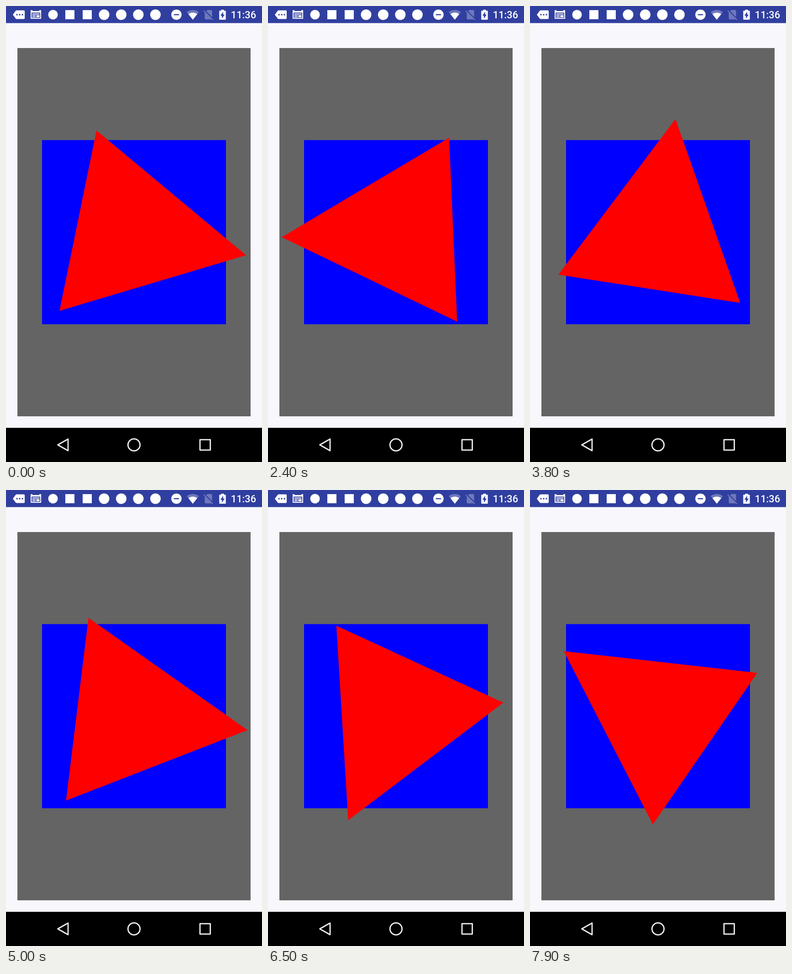
Animation, 561 px wide and 998 px high, one loop 8 s. Source, as an HTML page:

```html
<!DOCTYPE html>
<html lang="en">
<head>
<meta charset="utf-8">
<title>Rotating triangle</title>
<style>
  html, body { margin: 0; width: 100%; height: 100%; overflow: hidden; background: #f8f8fc; }
  svg { display: block; width: 561px; height: 998px; }
  text { font: 500 21.8px Roboto, sans-serif; }
</style>
</head>
<body>
<svg viewBox="0 0 561 998">
  <rect width="561" height="998" fill="#f8f8fc"/>
  <rect width="561" height="37.4" fill="#303f9f"/>

  <!-- status bar -->
  <g fill="#fff">
    <path d="M15 19 21 10.8Q22 9.5 23.5 9.5H39Q41 9.5 41 11.5V26.5Q41 28.5 39 28.5H23.5Q22 28.5 21 27.2Z"/>
    <g fill="#303f9f">
      <circle cx="24" cy="19" r="1.7"/><circle cx="30" cy="19" r="1.7"/><circle cx="36" cy="19" r="1.7"/>
    </g>
    <path d="M54 9H58V11H73V9H77V28H54ZM56 14.5V26H75V14.5Z" fill-rule="evenodd"/>
    <path d="M57.5 16.500H73.500V18.500H57.500ZM57.500 20H65V21.700H57.500ZM57.500 23H65V24.700H57.500ZM66.500 20H73.500V24.700H66.500Z"/>
    <circle cx="103" cy="19" r="10.5"/>
    <rect x="130" y="9" width="20" height="20"/>
    <rect x="168" y="9" width="20" height="20"/>
    <circle cx="215" cy="19" r="11.5"/>
    <circle cx="252.5" cy="19" r="11.5"/>
    <circle cx="290" cy="19" r="11.5"/>
    <circle cx="327.5" cy="19" r="11.5"/>
    <circle cx="373.5" cy="19" r="11.3"/>
    <rect x="367.8" y="17.8" width="11.4" height="2.4" fill="#303f9f"/>
    <g transform="translate(395.6 5.2) scale(1.15)">
      <path d="M12 21.5 23.64 7C23.2 6.66 18.700 3 12 3S.8 6.66.36 7Z" opacity=".3"/>
      <path d="M12 21.500 20.470 10.950C20 10.600 16.800 8 12 8S4 10.600 3.530 10.950Z"/>
    </g>
    <path transform="translate(429.800 5.200) scale(1.150)" opacity=".3"
      d="M19 5C19 3.900 18.100 3 17 3H10L7.660 5.340 19 16.680ZM3.650 3.880 2.380 5.150 5 7.770V19C5 20.100 5.900 21 7 21H17Q17.500 21 18 20.740L19.850 22.620 21.120 21.350Z"/>
    <path d="M471.500 8H477.500V10.300H480.500Q481.700 10.300 481.700 11.500V28.800Q481.700 30 480.500 30H468.500Q467.300 30 467.300 28.800V11.500Q467.300 10.300 468.500 10.300H471.500Z"/>
    <path d="M475.800 12.500 469.800 21.300H473.200V27.800L479.200 18.800H475.800Z" fill="#303f9f"/>
    <text x="492.800" y="26.800">11:36</text>
  </g>

  <!-- scene -->
  <rect x="25" y="92" width="511" height="806" fill="#646464"/>
  <rect x="79" y="293.500" width="403" height="403" fill="#00f"/>
  <path id="tri" d="M250.700 0-125.300 201.500V-201.500Z" fill="#f00"/>

  <!-- navigation bar -->
  <rect y="923.200" width="561" height="75"/>
  <g fill="none" stroke="#eee" stroke-width="2.800" stroke-linejoin="round">
    <path d="M113.500 960.500 136 947.800V973.200Z"/>
    <circle cx="280.500" cy="960.500" r="13.200"/>
    <rect x="425.100" y="949.200" width="22.600" height="22.600"/>
  </g>
</svg>
<script>
  const LOOP = 8000, STEP = 100;
  // [time in ms, angle in degrees]: about 72 degrees a second, slightly uneven
  const keys = [[0, 11.6], [1100, 85.1], [2400, 177.5], [3800, 278.8],
                [5000, 367], [6500, 474.7], [7900, 574.6]];
  const tri = document.getElementById('tri');

  function angleAt(t) {
    const i = Math.max(1, keys.findIndex(k => k[0] >= t));
    const [t0, a0] = keys[i - 1], [t1, a1] = keys[i];
    return a0 + (a1 - a0) * (t - t0) / (t1 - t0);
  }

  function draw() {
    const t = Math.floor(performance.now() % LOOP / STEP) * STEP;
    tri.setAttribute('transform', `translate(280.5 495) rotate(${angleAt(t)})`);
    requestAnimationFrame(draw);
  }
  draw();
</script>
</body>
</html>
```
